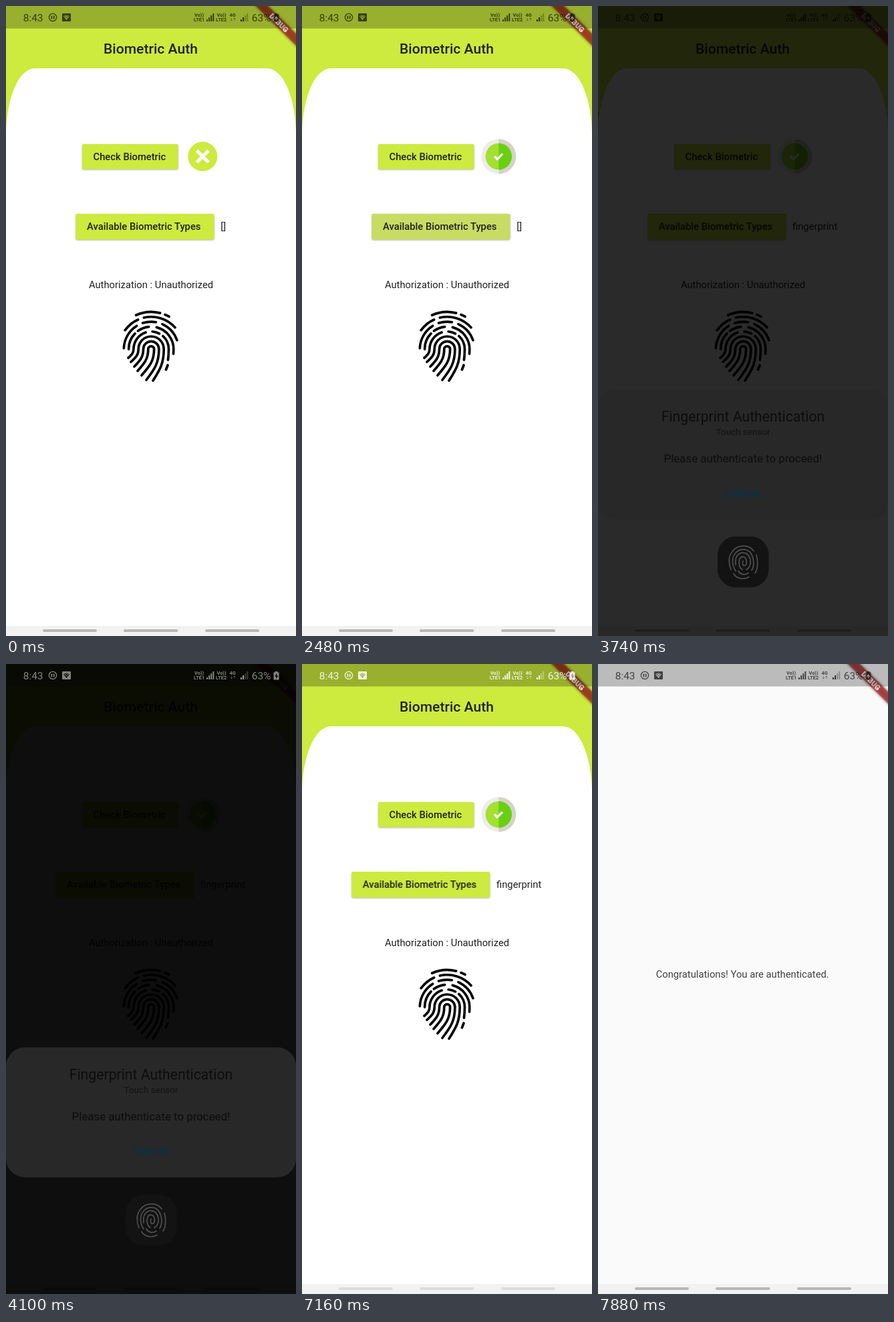
Animation, 434 px wide and 940 px high, one loop 8 s. Source, as an HTML page:

```html
<!DOCTYPE html>
<html lang="en">
<head>
<meta charset="utf-8">
<title>Biometric Auth</title>
<style>
  html, body { margin: 0; width: 100%; height: 100%; overflow: hidden; background: #fff; }
  svg { display: block; width: 434px; height: 940px; font: 14.77px Roboto, sans-serif; }
  .mid { text-anchor: middle; }
  .medium { font-weight: 500; }
  .button { fill: #cdea3e; filter: drop-shadow(0 1.5px 1.2px rgba(0, 0, 0, .3)); }
  .line { fill: none; stroke-linecap: round; stroke-linejoin: round; }
  #status { fill: currentColor; stroke: none; color: rgba(0, 0, 0, .65); }
  .tiny { font-size: 7.4px; font-weight: 700; }
</style>
</head>
<body>
<svg viewBox="0 0 434 940">
  <defs>
    <filter id="soft" x="-20%" y="-100%" width="140%" height="300%"><feGaussianBlur stdDeviation="2"/></filter>
    <g id="bars">
      <rect y="9" width="2" height="3"/><rect x="3.1" y="6" width="2" height="6"/>
      <rect x="6.2" y="3" width="2" height="9"/><rect x="9.3" width="2" height="12"/>
    </g>
  </defs>

  <!-- Login screen -->
  <rect width="434" height="940" fill="#fff"/>
  <rect width="434" height="193" fill="#cdea3e"/>
  <path d="M0 193A43 100 0 0 1 43 93H391A43 100 0 0 1 434 193V925H0Z" fill="#fff"/>
  <g fill="#212121">
    <text class="mid medium" x="216.5" y="71" font-size="21.1">Biometric Auth</text>

    <rect class="button" x="114" y="206" width="143.5" height="37.5" rx="2"/>
    <rect id="pressCheck" x="114" y="206" width="143.5" height="37.5" rx="2" fill="#bcbcbc"/>
    <text class="medium" x="130.5" y="230">Check Biometric</text>

    <g id="types">
      <rect class="button" x="104.5" y="310" width="207" height="38.5" rx="2"/>
      <rect id="pressTypes" x="104.5" y="310" width="207" height="38.5" rx="2" fill="#bcbcbc"/>
      <text class="medium" x="121" y="334.3">Available Biometric Types</text>
    </g>
    <text id="noTypes" x="321.3" y="334.3">[]</text>
    <text id="oneType" x="291" y="334.3">fingerprint</text>
    <text class="mid" x="217" y="420.5">Authorization : Unauthorized</text>
  </g>

  <g id="cross">
    <circle cx="294.3" cy="224.5" r="22" fill="#cdea3e"/>
    <path d="M285.5 215.7l17.6 17.6m0-17.6l-17.6 17.6" stroke="#fff" stroke-width="5"/>
  </g>
  <g id="tick">
    <circle cx="294.3" cy="224.5" r="26" fill="#ececea"/>
    <path d="M294.3 198.5a26 26 0 0 1 0 52z" fill="#d6d2c8"/>
    <circle cx="294.3" cy="224.5" r="19.7" fill="#a4df32"/>
    <path d="M294.3 204.8a19.7 19.7 0 0 1 0 39.4z" fill="#68d010"/>
    <path d="M288 224.3l4.3 4.3 7.8-8" class="line" stroke="#fbfaf4" stroke-width="3.4" style="stroke-linecap:butt"/>
  </g>

  <rect id="pressPrint" x="147.5" y="455.5" width="139" height="105" fill="#efefef"/>
  <path id="print" class="line" stroke="#050505" stroke-width="3.7"/>

  <!-- Success screen -->
  <g id="success">
    <rect width="434" height="1000" fill="#fafafa"/>
    <text class="mid" x="216.2" y="467.7" fill="#404040">Congratulations! You are authenticated.</text>
  </g>

  <g transform="translate(408.5 25) rotate(44.5)">
    <rect x="-60" y="-6.4" width="120" height="12.8" filter="url(#soft)" opacity=".5"/>
    <rect x="-60" y="-6.4" width="120" height="12.8" fill="#b71c1c" fill-opacity=".63"/>
    <text class="mid" y="3.9" font-size="10.8" font-weight="900" fill="#fff">DEBUG</text>
  </g>
  <rect width="434" height="33.5" opacity=".25"/>
  <rect y="925" width="434" height="15" fill="#f2f2f2"/>
  <g id="pills" fill="#b7b7b7">
    <rect x="55" y="930" width="81" height="4" rx="2"/>
    <rect x="176" y="930" width="81.5" height="4" rx="2"/>
    <rect x="298" y="930" width="81" height="4" rx="2"/>
  </g>

  <!-- Fingerprint dialog -->
  <rect id="scrim" width="434" height="940"/>
  <g id="dialog">
    <rect y="572" width="434" height="194" rx="28" fill="#282828"/>
    <g class="mid" fill="#0d0d0d">
      <text x="217" y="619.5" font-size="21.2">Fingerprint Authentication</text>
      <text x="217" y="640" font-size="13.5" fill="#121212">Touch sensor</text>
      <text x="217" y="681" font-size="16.86">Please authenticate to proceed!</text>
      <text x="217" y="732.3" font-size="16.9" font-weight="700" fill="#0c2f45">Cancel</text>
    </g>
    <rect x="179" y="791.5" width="76.5" height="76" rx="27" fill="#131313"/>
    <g class="line" stroke="#505050" stroke-width="1.7">
      <path d="M199 841C195 832 195 821 201 814C209 803 226 803 233 813M237 819C240 829 239 840 235 846"/>
      <path d="M226 852C217 857 207 854 203 847M206 843C200 834 200 822 206 816C213 808 225 810 229 817C234 825 234 836 230 842"/>
      <path d="M225 846C219 850 213 848 210 843M206 834C205 826 206 820 212 817C220 813 227 819 228 827C229 834 226 839 222 841"/>
      <path d="M216 841C211 838 210 830 212 825C214 820 221 821 222 827C223 832 222 835 219 835C216 835 216 831 217 828"/>
    </g>
  </g>
  <g id="glow">
    <circle cx="217.2" cy="829.5" r="38.3" fill="#13fd08"/>
    <circle id="warm" cx="217.8" cy="830.5" r="35.5" fill="#10e808"/>
  </g>

  <!-- Status bar -->
  <g id="status">
    <text x="25.7" y="23" font-size="15.5">8:43</text>
    <circle cx="70" cy="17" r="5.6" fill="none" stroke="currentColor" stroke-width="1.3"/>
    <path d="M67.5 14.5h1.7v5h-1.7zM70.8 14.5h1.7v5h-1.7z"/>
    <path fill-rule="evenodd" d="M85 11H96Q97 11 97 12V22Q97 23 96 23H85Q84 23 84 22V12Q84 11 85 11ZM86 15.5L90.5 21 95 15.5Q90.5 11.6 86 15.5Z"/>
    <path d="M87 16Q90.5 13.4 94 16M88.6 18Q90.5 16.6 92.4 18" fill="none" stroke="currentColor"/>
    <g class="tiny">
      <text x="282" y="15.5">Vo))</text><text x="281" y="23">LTE1</text>
      <text x="315.5" y="15.5">Vo))</text><text x="314" y="23">LTE2</text>
      <text x="334.5" y="16">4G</text>
    </g>
    <path d="M337.5 18v4m-1.5-1.5l1.5 1.5 1.5-1.5M342 22v-4m-1.5 1.5l1.5-1.5 1.5 1.5" fill="none" stroke="currentColor" opacity=".5"/>
    <use href="#bars" x="300" y="11"/>
    <use href="#bars" x="351" y="11" opacity=".4"/>
    <path d="M351 20h2v3h-2zM354.1 17h2v6h-2z"/>
    <text x="367.7" y="23" font-size="15.5">63%</text>
    <path fill-rule="evenodd" d="M402.5 11h4v1.5h2v11h-8v-11h2zM405.3 14l-3.3 4.6h2.2v3.4l3.2-4.6h-2.1z"/>
  </g>
</svg>

<script>
const LOOP = 8000;
const $ = id => document.getElementById(id);

// Fingerprint ridges: concentric arcs; the inner ones sweep down into tails.
const CX = 217.2, CY = 512;
const radius = ring => 4.4 + ring * 7.3;
const polar = (r, deg) => {
  const a = deg * Math.PI / 180;
  return `${CX + r * Math.cos(a)} ${CY + r * Math.sin(a)}`;
};
const arc = (ring, from, to) => {
  const r = radius(ring);
  return `M${polar(r, from)}A${r} ${r} 0 0 1 ${polar(r, to)}`;
};
const tail = (ring, side, x, y) => {
  const sx = CX + side * radius(ring);
  return `M${sx} ${CY}C${sx} ${CY + (y - CY) * .45} ${x + (sx - x) * .65} ${y - (y - CY) * .35} ${x} ${y}`;
};
const ridges = [
  [0, -180, 0], [1, -180, 0], [2, -180, 0],
  [3, -180, -108], [3, -86, -62], [3, -48, 0],
  [4, -180, -136], [4, -126, -96], [4, -76, 0],
  [5, -178, -122], [5, -108, -80], [5, -66, -19],
  [6, -144, -114], [6, -103, -42],
  [7, -114, -76], [7, -68, -61]
];
const tails = [
  [3, -1, 183, 525], [2, -1, 187, 531], [1, -1, 192, 538], [0, -1, 197, 544.5],
  [0, 1, 203, 551], [1, 1, 210, 558], [2, 1, 220, 559],
  [3, 1, 242.5, 528], [4, 1, 250.5, 519]
];
$('print').setAttribute('d',
  ridges.map(r => arc(...r)).join('') + tails.map(t => tail(...t)).join('') + 'M242 536L239.5 542.5');

// Each row is [ms, value]; the value holds until the next row.
const hold = (id, prop, rows) => $(id).animate(
  rows.map(([ms, value]) => ({ offset: ms / LOOP, [prop]: value, easing: 'step-end' })),
  { duration: LOOP, iterations: Infinity });
const between = (id, from, to, level = 1) =>
  hold(id, 'opacity', [[0, 0], [from, level], [to, 0]]);

between('pressCheck', 1220, 1400, .3);
between('pressTypes', 2480, 2660, .3);
between('pressPrint', 3560, 3740);
hold('cross', 'opacity', [[0, 1], [1400, 0]]);
hold('tick', 'opacity', [[0, 0], [1400, 1]]);
hold('types', 'transform', [[0, 'translateX(0px)'], [2660, 'translateX(-30.3px)']]);
hold('noTypes', 'opacity', [[0, 1], [2660, 0]]);
hold('oneType', 'opacity', [[0, 0], [2660, 1]]);

hold('scrim', 'opacity', [[0, 0], [3740, .835], [3920, .945], [7160, 0]]);
between('dialog', 3740, 7160);
between('glow', 5540, 7160);
between('warm', 5540, 5720);
hold('status', 'color', [
  [0, 'rgba(0,0,0,.65)'], [3920, 'rgba(255,255,255,.5)'],
  [7160, 'rgba(255,255,255,.88)'], [7340, 'rgba(0,0,0,.65)']
]);
hold('pills', 'fill', [[0, '#b7b7b7'], [7160, '#dddddd'], [7340, '#b7b7b7']]);

hold('success', 'opacity', [[0, 0], [7340, .22], [7520, 1]]);
hold('success', 'transform', [[0, 'translateY(128px)'], [7520, 'translateY(0px)']]);
</script>
</body>
</html>
```
